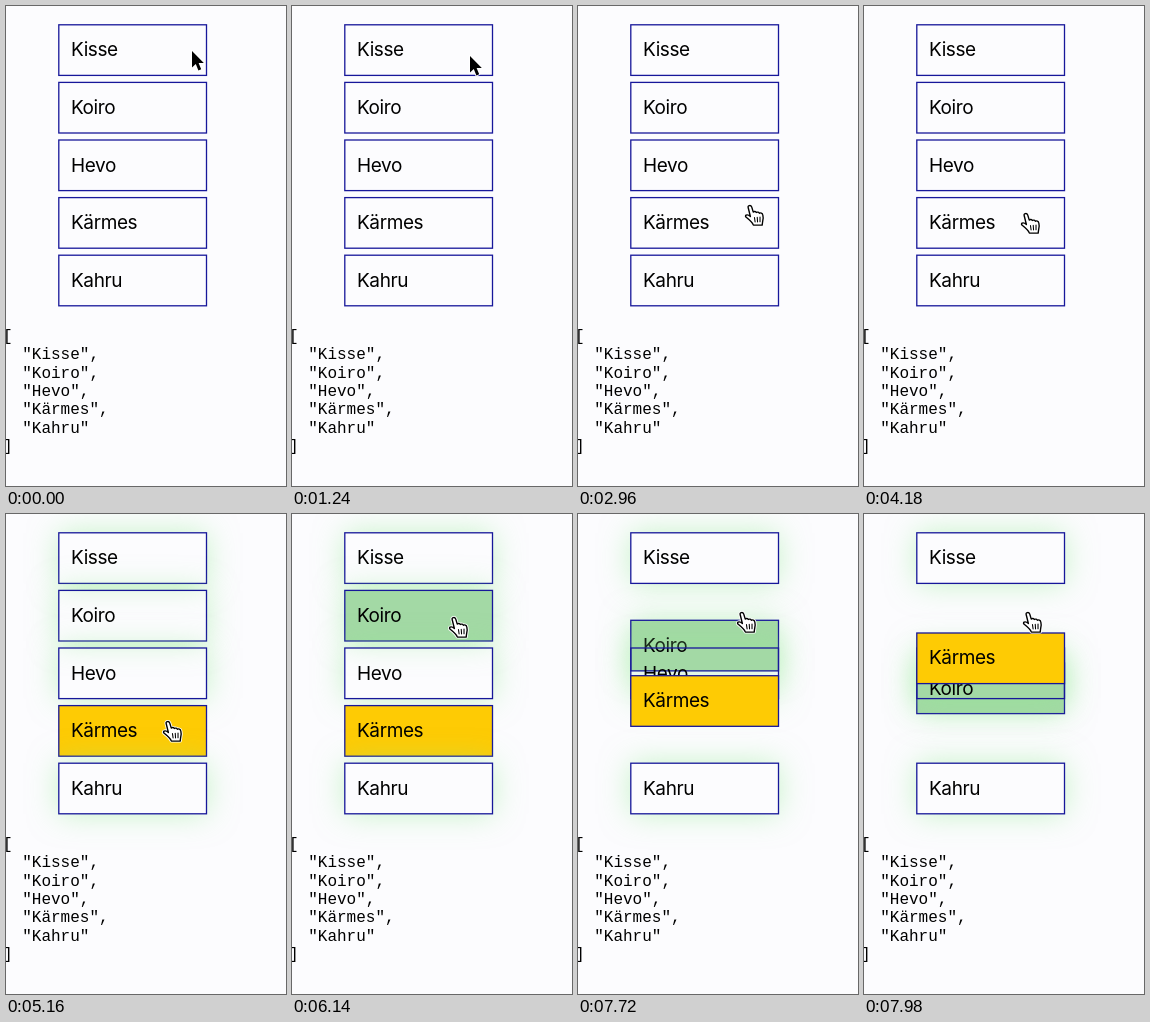
Animation, 280 px wide and 480 px high, one loop 8000 ms. Source, as an HTML page with a canvas:

```html
<!DOCTYPE html>
<html lang="et">
<head>
<meta charset="utf-8">
<title>Swap list</title>
<style>
  html, body { margin: 0; width: 100%; height: 100%; overflow: hidden; background: #fcfcfe; }
  canvas { display: block; }
</style>
</head>
<body>
<canvas id="stage" width="280" height="480"></canvas>
<script>
const ctx = document.getElementById('stage').getContext('2d');
const LOOP = 8000;
const PAPER = '#fcfcfe';
const BOX = { x: 52.8, top: 18.8, pitch: 57.6, w: 147.7, h: 50.6 };
const words = ['Kisse', 'Koiro', 'Hevo', 'Kärmes', 'Kahru'];
const FIRST = 3, SECOND = 1;
const FIRST_CLICK = 4450, SECOND_CLICK = 5880;
const SWAP_START = 7358, SWAP_TIME = 1067;
const HAND_FROM = 1760;

// Pointer hotspot: time, x, y
const path = [
  [0, 186, 45], [200, 186, 45], [800, 178, 50], [1680, 178, 50],
  [2360, 172, 197], [2800, 172, 199], [3360, 172, 199], [3950, 162, 207],
  [5300, 162, 207], [5850, 162, 103], [6700, 162, 103], [7150, 164, 98]
];

const arrow = new Path2D('M0 0V16.5L3.8 13L6.4 19.4L9.2 18.2L6.6 12H11.8Z');
const hand = new Path2D('M3.5 3C3 .8 6 .2 6.8 2.4L8.3 7.6C9 6.6 10.8 6.9 11.2 8C12 7.2 13.6 7.6 14 8.8' +
  'C15 8 16.8 8.6 17.2 10.4C18 13.5 17.8 15 17 17.5L16.6 20.6H8.4C7.5 18 4 14.8 1.4 12.6' +
  'C.2 11 2.2 9.6 4 10.8L5.6 12Z');
const knuckles = new Path2D('M9.4 13L10 17.4M12 12.8L12.3 17.4M14.6 12.6V17.2');

const clamp = v => Math.min(1, Math.max(0, v));
const ramp = (t, start, time) => clamp((t - start) / time);
const ease = u => (1 - Math.cos(Math.PI * u)) / 2;
const mix = (a, b, u) => a + (b - a) * u;

function pointerAt(t) {
  const next = path.findIndex(p => p[0] > t);
  if (next < 0) return path[path.length - 1].slice(1);
  const [t0, x0, y0] = path[next - 1];
  const [t1, x1, y1] = path[next];
  const u = ease((t - t0) / (t1 - t0));
  return [mix(x0, x1, u), mix(y0, y1, u)];
}

function boxTop(i, t) {
  const shift = (FIRST - SECOND) * ease(ramp(t, SWAP_START, SWAP_TIME));
  const row = i === SECOND ? i + shift : i === FIRST ? i - shift : i;
  return BOX.top + row * BOX.pitch;
}

// Outer shadow only: the box itself is clipped out, its caster stays off stage
function drawGlow(y, alpha) {
  ctx.save();
  ctx.beginPath();
  ctx.rect(0, 0, 280, 480);
  ctx.rect(BOX.x, y, BOX.w, BOX.h);
  ctx.clip('evenodd');
  ctx.shadowColor = `rgba(144, 238, 144, ${0.5 * alpha})`;
  ctx.shadowBlur = 30;
  ctx.shadowOffsetX = 1000;
  ctx.fillRect(BOX.x - 1000, y, BOX.w, BOX.h);
  ctx.restore();
}

function fillBox(y, color, alpha) {
  ctx.globalAlpha = alpha;
  ctx.fillStyle = color;
  ctx.fillRect(BOX.x, y, BOX.w, BOX.h);
  ctx.globalAlpha = 1;
}

function drawBoxes(t) {
  const gold = ramp(t, FIRST_CLICK, 200);
  const green = ramp(t, SECOND_CLICK, 260);

  ctx.font = '19px Inter, sans-serif';
  ctx.letterSpacing = '-0.4px';
  words.forEach((word, i) => {
    const y = boxTop(i, t);
    if (i === FIRST) fillBox(y, '#fecb04', gold);
    else if (gold > 0) drawGlow(y, gold);
    if (i === SECOND) fillBox(y, '#a3d9a5', green);
    ctx.strokeStyle = '#17179a';
    ctx.lineWidth = 1.3;
    ctx.strokeRect(BOX.x, y, BOX.w, BOX.h);
    ctx.fillStyle = '#000';
    ctx.fillText(word, 65, y + 31.5);
  });
}

function drawJson() {
  const lines = JSON.stringify(words, null, 2).split('\n');
  ctx.font = '16px "Liberation Mono", monospace';
  ctx.letterSpacing = '0px';
  ctx.fillStyle = '#000';
  lines.forEach((line, i) => ctx.fillText(line, -3, 335 + i * 18.3));
}

function drawPointer(t) {
  const [x, y] = pointerAt(t);
  ctx.save();
  ctx.lineJoin = ctx.lineCap = 'round';
  if (t < HAND_FROM) {
    ctx.translate(x, y);
    ctx.strokeStyle = '#fff';
    ctx.lineWidth = 2;
    ctx.stroke(arrow);
    ctx.fillStyle = '#000';
    ctx.fill(arrow);
  } else {
    ctx.translate(x - 5.6, y - 0.5);
    ctx.scale(1.07, 1);
    ctx.strokeStyle = '#fff';
    ctx.lineWidth = 3;
    ctx.stroke(hand);
    ctx.fillStyle = '#fff';
    ctx.fill(hand);
    ctx.strokeStyle = '#000';
    ctx.lineWidth = 1.3;
    ctx.stroke(hand);
    ctx.lineWidth = 1;
    ctx.stroke(knuckles);
  }
  ctx.restore();
}

function draw(t) {
  ctx.fillStyle = PAPER;
  ctx.fillRect(0, 0, 280, 480);
  drawBoxes(t);
  drawJson();
  drawPointer(t);
}

const start = performance.now();
function tick() {
  draw((performance.now() - start) % LOOP);
  requestAnimationFrame(tick);
}
tick();
</script>
</body>
</html>
```
